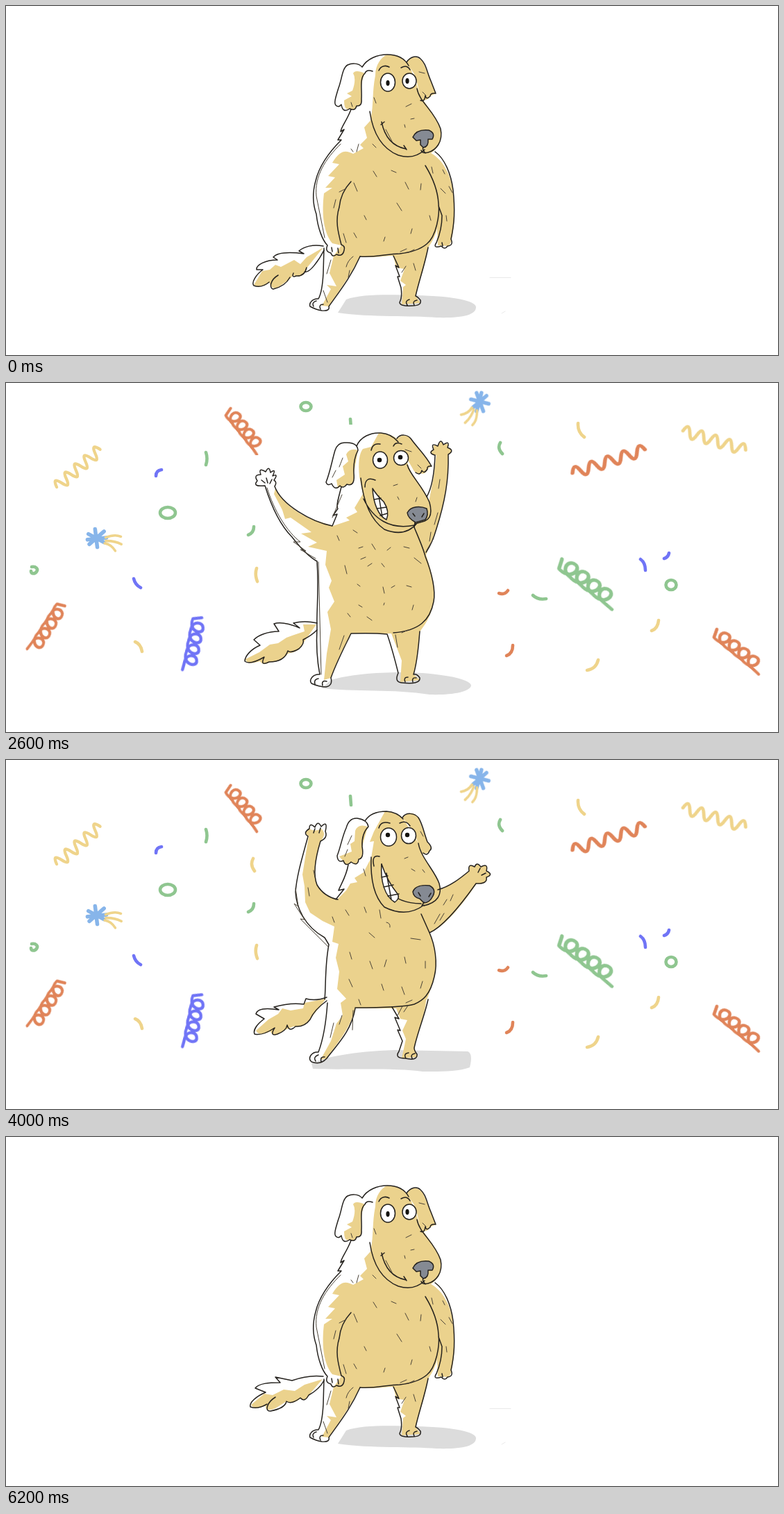
An HTML page without scripts for the animation above (6400 ms loop, 1112 by 503 pixels).

```html
<!DOCTYPE html>
<html lang="en">
<head>
<meta charset="utf-8">
<title>Party dog</title>
<style>
html, body { margin: 0; width: 100%; height: 100%; overflow: hidden; background: #fff; }
svg { display: block; width: 100%; height: 100%; }
.fur { fill: #ebd28d; }
.white { fill: #fff; }
.shade { fill: #dcdcdc; }
.nose { fill: #858a93; }
.dog { stroke-linecap: round; stroke-linejoin: round; }
.line { fill: none; stroke: #25221e; stroke-width: 1.5; }
.thin { fill: none; stroke: #4a4337; stroke-width: 1; }
.eye { fill: #fff; stroke: #25221e; stroke-width: 1.5; }
.pupil { fill: #15130f; }
.confetti { fill: none; stroke-width: 4.6; stroke-linecap: round; stroke-linejoin: round; }
.confetti path, .confetti ellipse { vector-effect: non-scaling-stroke; }
.red { stroke: #e08459; } .gold { stroke: #efd48b; } .green { stroke: #8fc690; }
.blue { stroke: #7074f6; } .sky { stroke: #87b5ea; }

/* 32 beats of 200 ms, 3.125% each */
.dog, .confetti, .tail, .gap { animation: 6.4s step-end infinite; }
.idle { animation-name: idle; }
.down { animation-name: down; }
.up { animation-name: up; }
.wide { animation-name: wide; }
.tilt { animation-name: tilt; }
.fall1 { animation-name: fall1; }
.fall2 { animation-name: fall2; }
.gap { animation-name: gap; }
@keyframes idle { 0%, 87.5% { opacity: 1 } 34.375% { opacity: 0 } }
@keyframes down {
  0%, 18.75%, 25%, 31.25%, 93.75% { opacity: 1 }
  15.625%, 21.875%, 28.125%, 90.625%, 96.875% { opacity: 0 }
  87.5% { opacity: 1 }
}
@keyframes up {
  0%, 18.75%, 25%, 31.25%, 93.75% { opacity: 0 }
  15.625%, 21.875%, 28.125%, 90.625%, 96.875% { opacity: 1 }
}
@keyframes wide {
  0%, 37.5%, 43.75%, 50%, 56.25%, 62.5%, 68.75%, 78.125%, 84.375% { opacity: 0 }
  34.375%, 40.625%, 46.875%, 53.125%, 59.375%, 65.625%, 75%, 81.25% { opacity: 1 }
}
@keyframes tilt {
  0%, 40.625%, 46.875%, 53.125%, 59.375%, 65.625%, 75%, 81.25%, 87.5% { opacity: 0 }
  37.5%, 43.75%, 50%, 56.25%, 62.5%, 68.75%, 78.125%, 84.375% { opacity: 1 }
}
@keyframes fall1 {
  0%, 37.5%, 50%, 62.5%, 78.125%, 87.5% { opacity: 0 }
  34.375%, 43.75%, 56.25%, 71.875%, 84.375% { opacity: 1 }
}
@keyframes fall2 {
  0%, 43.75%, 56.25%, 71.875%, 84.375% { opacity: 0 }
  37.5%, 50%, 62.5%, 78.125% { opacity: 1 }
}
@keyframes gap { 0%, 50% { opacity: 0 } 34.375% { opacity: 1 } }
</style>
</head>
<body>
<svg viewBox="0 0 1112 503">
<defs>
  <path id="wave" d="M0 0q5-16 10 0t10 0 10 0 10 0 10 0 10 0 10 0 10 0 10 0"/>
  <path id="coil" d="M-3-6L1 7c20 5 23-19 12-18s-9 19 5 18c20 5 23-19 12-18s-9 19 5 18c20 5 23-19 12-18s-9 19 5 18c20 5 23-19 12-18s-9 19 5 18l12 1"/>
  <g id="star">
    <path class="sky" d="M-10-3L10 4M8-9L-7 9M-3-10L3 11M-10 4L12-2"/>
    <path class="gold" stroke-width="3" d="M11-2q10-6 18-4M12 2q10-2 19 1M11 5q8 0 14 7"/>
  </g>
</defs>

<g class="confetti fall1">
  <use href="#wave" class="gold" transform="translate(51 164)rotate(-34)scale(1.04 1)"/>
  <use href="#wave" class="red" transform="translate(835 124)rotate(-17)scale(1.18 1)"/>
  <use href="#wave" class="gold" transform="translate(996 68)rotate(27)scale(1.06 1)"/>
  <use href="#coil" class="red" transform="translate(330 56)rotate(57)scale(.87 .9)"/>
  <use href="#coil" class="red" transform="translate(64 330)rotate(112)scale(1 .9)"/>
  <use href="#coil" class="blue" transform="translate(270 356)rotate(90)scale(.92 .95)"/>
  <use href="#coil" class="green" transform="translate(813 274)rotate(39)scale(1.2 1.05)"/>
  <use href="#coil" class="red" transform="translate(1045 374)rotate(51)scale(.92 .9)"/>
  <use href="#star" transform="translate(687 23)rotate(132)scale(1.1 .85)"/>
  <use href="#star" transform="translate(127 223)"/>
  <g class="green">
    <ellipse cx="430" cy="41" rx="6.5" ry="5"/><ellipse cx="232" cy="191" rx="9" ry="7"/>
    <ellipse cx="961" cy="298" rx="8.5" ry="6.5"/><path d="M46 268c-4 3-8 1-8-2s5-2 7-1"/>
    <path d="M285 121q7-5 6-16M337 226q11 2 19-5M712 95q6 9 17 7M768 316q6 1 11-2M489 76q9-5 11-17"/>
  </g>
  <g class="gold">
    <path d="M360 276q3 11 15 12M196 379q3 12-3 19M928 359q7 2 11-4M833 417q15 5 24-4M832 71q5 9 17 7M357 151q2 9 11 11"/>
  </g>
  <path class="blue" d="M221 136q-3 4-1 9M190 293q9 6 20 2M916 274q6-2 5-8M947 257q8-1 11-8"/>
  <path class="red" d="M706 308q14 4 21-6M713 400q14 2 20-10"/>
</g>

<g class="confetti fall2">
  <use href="#wave" class="gold" transform="translate(73 150)rotate(-41)scale(.92 1)"/>
  <use href="#wave" class="red" transform="translate(816 130)rotate(-18)scale(1.22 1)"/>
  <use href="#wave" class="gold" transform="translate(975 69)rotate(17)scale(1.05 1)"/>
  <use href="#coil" class="red" transform="translate(321 42)rotate(51)scale(.9)"/>
  <use href="#coil" class="red" transform="translate(79 321)rotate(123)scale(.97 .85)"/>
  <use href="#coil" class="blue" transform="translate(276 340)rotate(101)scale(.94)"/>
  <use href="#coil" class="green" transform="translate(800 261)rotate(37)scale(1.2 1.05)"/>
  <use href="#coil" class="red" transform="translate(1023 361)rotate(39)scale(1.04 .9)"/>
  <use href="#star" transform="translate(683 27)rotate(120)scale(1.2)"/>
  <use href="#star" transform="translate(130 223)rotate(9)scale(1.2)"/>
  <g class="green">
    <ellipse cx="432" cy="34" rx="7.5" ry="6"/><ellipse cx="233" cy="187" rx="11" ry="8"/>
    <ellipse cx="958" cy="291" rx="7.5" ry="7"/><path d="M37 265c6-1 10 3 7 7s-8 3-8-1"/>
    <path d="M288 100q3 9 0 18M349 219q8-3 8-12M712 86q-5 8 3 16M759 306q7 7 19 5M496 52l1 13"/>
  </g>
  <g class="gold">
    <path d="M356 142q-5 9 2 18M361 267q-3 9 1 19M186 373q8 3 10 14M930 357q9-3 10-15M837 414q13-2 16-15M824 58q-1 13 9 20"/>
  </g>
  <path class="blue" d="M216 134q0-8 8-9M184 282q2 9 10 13M914 254q7 5 7 16M948 253q6-2 7-8"/>
  <path class="red" d="M710 303q8 3 13-4M721 393q9-3 9-15"/>
</g>

<g class="dog idle">
  <path class="shade" d="M478 442L490 423C512 415 550 416 590 417C645 418 677 425 677 434C677 446 655 450 620 449C585 446 525 449 478 442Z"/>
  <path fill="none" stroke="#e9e9e9" d="M697 391.500H727M714 443l5-3"/>
  <g class="tail down">
    <path class="fur" d="M457 348L433 362L424 372L415 366L396 376L388 373L380 380L369 382L357 402Q368 408 379 398Q384 412 394 404L408 394L414 388Q428 395 433 378Z"/>
    <path class="line" d="M457 346C442 343 429 347 422 353L429 357C405 354 390 356 385 362L391 366C374 366 360 373 361 380L370 380C360 387 353 399 357 403Q368 407 379 398M392 388C380 395 379 407 385 408Q402 404 409 391M414 385Q411 392 418 389Q430 390 433 377M430 383C437 386 451 366 458 352"/>
  </g>
  <g class="tail up">
    <path class="fur" d="M456 349L430 357L416 366L400 364L384 372L372 370L353 386Q357 394 374 387Q373 397 388 391L404 381Q413 386 424 377Q432 383 436 372Z"/>
    <path class="line" d="M457 345C440 343 423 347 412 351L388 346L395 354C378 354 364 355 359 362L374 368C360 374 350 383 352 389Q362 393 376 385M388 375C376 382 372 396 381 395Q402 391 404 381Q411 386 424 376Q430 383 436 372Q451 364 458 351"/>
  </g>
  <path class="fur" d="M549 70C565 70 575 77 582 88L594 120C597 137 618 152 626 178C630 196 620 207 612 212C630 222 642 245 644 270C647 300 646 320 641 340L638 346L622 345L621 320C618 335 610 345 607 350C604 375 594 400 590 418L597 428L570 430L572 405L576 402L568 396L574 379L562 377L558 360C545 360 525 364 510 361C495 390 480 410 465 433L455 432L468 408L462 402L476 404L466 385L472 360L483 345L470 342C456 325 455 295 458 270L470 262L460 262L474 247L464 245L480 228L470 226C482 206 490 208 500 213L515 205L510 200L520 190L516 175L525 165C530 140 527 125 532 100C532 85 540 74 549 70Z"/>
  <path class="fur" d="M517 97Q503 91 500 97Q505 105 499 122L491 126L498 130L487 136Q487 152 495 148Q503 151 505 144Q513 144 512 134Q510 110 517 97ZM577 81Q588 67 600 80Q606 92 619 126L611 130Q607 138 597 135Q596 122 588 98Z"/>
  <path class="line" d="M513 88C520 76 535 70 549 70C563 70 574 75 580 86M513 88C508 82 498 82 492 85C484 90 484 105 479 118C475 131 472 140 475 143Q479 147 483 142Q485 155 495 148Q503 152 505 144Q513 145 512 134C513 120 509 104 517 97Q519 91 528 94M577 81C583 72 592 71 597 76C605 83 606 94 612 108L619 126Q611 125 611 130Q605 136 604 129Q603 139 597 136M592 119C595 138 617 151 626 177C630 196 619 208 608 211Q599 213 598 208M524 152C528 180 540 205 565 215Q588 222 603 207"/>
  <path class="line" stroke-width="2" d="M541 167C545 187 556 202 576 206M573 201L577 207M540 171L545 167M537 93C540 86 547 85 552 88M569 89Q578 84 582 92M601 203Q599 207 604 212"/>
  <path class="line" d="M497 149C491 165 483 174 482 181L487 178L478 193L483 193C466 210 451 231 446 252C441 270 442 286 447 300C449 320 456 338 463 345Q459 354 468 356Q470 363 476 358Q485 362 487 352Q489 346 483 344C478 325 474 309 480 290Q482 269 497 253M510 361C530 363 550 357 567 357Q593 354 606 343C620 332 625 300 623 285C622 266 615 248 604 230M618 210C632 220 641 242 644 265C647 294 646 313 641 336Q645 345 636 346Q632 352 627 346Q614 350 620 341Q628 322 628 302L623 288"/>
  <path class="line" d="M458 349L457 385C456 404 454 415 450 422C442 421 436 428 438 433Q447 438 455 439Q467 440 465 433C482 409 497 390 510 361M443 433q-3-6 4-8M453 437q-3-7 4-7M558 360L566 377L561 374L567 390L564 390L569 406Q571 420 567 427Q567 433 585 432Q599 432 597 424Q593 419 590 418C594 399 604 370 608 348M578 431q-4-6 3-8M588 431q-3-6 4-7M470 354l-1-6M479 356l-1-7M629 346l-1-5"/>
  <path class="thin" d="M482 199C460 220 444 246 447 274L459 334M500 361Q492 367 490 376M480 268l10-5M472 291l3-12M462 386l6-20M457 410l6 17M615 241l-2-9M629 236l3 6M626 263l7 7M638 260l5 9M634 302l1 8M497 206l3 4M508 199l-3 11M528 199l5 5M547 178l9 17M529 238l5 8M501 255l5 12M555 237l7 3M575 254l5 10M598 256l-1 9M563 284l7 11M516 302l3 6M610 302l2 7M546 333l-2 6M501 327l4 7M585 321l-2 7M486 328l4 13M568 354l9-4M580 355l8-4M576 145l8-4M583 163l5-1M574 171l1 4M595 95l8 2M600 124l5 5M497 139l2 6M570 384l6-9M587 371l3 10M493 391l2-10M530 132l3 8"/>
  <path class="nose line" style="fill:#858a93" d="M586 189C590 180 600 178 609 179Q619 183 614 192L608 192Q609 203 601 204L597 200V193L591 194Z"/>
  <ellipse class="eye" cx="550" cy="110" rx="10.500" ry="13"/><ellipse class="eye" cx="581" cy="108" rx="10" ry="11"/>
  <ellipse class="pupil" cx="550" cy="111" rx="2.600" ry="4"/><ellipse class="pupil" cx="578" cy="108" rx="2.600" ry="4"/>
</g>

<g class="dog wide">
  <path class="white" d="M350 138h24v32h-24z"/>
  <path class="white gap" d="M354 104h24v22h-24zM484 60h24v20h-24z"/>
  <path class="shade" d="M455 440L468 428C500 418 560 415 600 418C650 422 670 430 670 436C668 446 640 450 610 449C560 441 500 445 455 440Z"/>
  <path class="fur" d="M447 348L428 348L430 358L415 363L404 367L392 375L380 377L365 388L345 398Q346 407 366 401Q370 408 381 402Q396 403 406 390Q424 387 428 375Z"/>
  <path class="fur" d="M537 72Q560 73 568 86L580 120C584 134 602 150 610 172Q615 193 604 198L616 135L620 103L637 102C638 140 631 172 620 210L605 248C614 275 620 300 615 318C612 342 595 357 596 360Q593 400 587 420L596 428L568 431L570 400L562 379L555 361H497C484 385 475 405 468 425L458 428L462 390L468 355L463 330L473 315L465 295L469 285L460 262L462 242L435 236L448 230L425 217L440 215L410 194L402 196L398 183L386 160L388 152C398 172 418 187 440 196L471 206L495 198L490 194L506 186L502 180L514 160L509 135Q506 105 514 95L526 92Z"/>
  <path class="fur" d="M507 97Q495 93 490 103L493 113L485 120L488 132L476 140L478 151L491 147Q503 147 501 130ZM563 80Q575 71 583 80C592 93 604 103 613 120L607 124Q604 133 597 130Q590 133 585 122L578 110ZM619 104Q607 101 616 96Q614 85 622 91Q626 80 630 89Q640 85 636 93Q647 97 637 104Z"/>
  <path class="line" d="M505 91C510 78 525 71 540 72Q555 73 565 85M507 97Q506 85 489 86Q478 85 474 97C470 110 467 128 461 143Q463 149 469 145Q474 156 481 148Q486 153 491 146Q503 150 501 130Q500 110 507 97M563 80C568 73 578 74 583 80C592 93 604 103 613 120Q606 119 607 124Q602 132 599 126Q597 134 590 129M578 118C582 133 600 148 610 172Q616 194 603 199L589 203M511 137C514 165 522 195 545 211Q575 223 592 202M515 167C529 196 553 212 588 205M517 150Q517 134 532 140M526 97Q528 86 539 88M558 91Q561 84 570 88"/>
  <path class="line" d="M483 150C479 165 475 178 478 181L471 191L477 189L470 206C440 200 397 176 387 149Q391 143 386 140Q393 130 384 134Q390 122 381 129Q379 118 374 128Q363 121 367 132Q356 132 362 141Q354 150 373 148C383 180 395 205 412 222Q432 248 448 257C451 300 447 330 448 352Q446 390 452 420C442 419 436 428 440 433Q451 438 461 438Q471 436 468 425C475 405 485 385 497 361Q530 360 549 362C556 382 561 402 565 418Q559 431 570 432Q597 435 596 425Q592 419 587 420C593 400 594 380 596 358M588 208C595 225 601 238 604 250C614 275 619 300 616 315C611 342 595 357 558 360M637 103C638 140 632 172 620 210Q614 231 605 244M618 104C617 130 613 152 606 164M618 104Q607 101 616 96Q611 85 622 91Q626 78 630 89Q640 82 636 93Q647 97 637 103"/>
  <path class="line" d="M448 346Q430 342 414 346L423 353C406 346 395 344 386 347L393 358C376 358 363 364 357 370L366 378C354 383 344 393 344 401Q351 407 372 395Q365 409 379 402Q401 402 406 386Q410 390 422 383Q430 376 428 370Q440 364 448 356M445 434q-2-7 5-8M456 436q-2-8 6-6M575 431q-3-7 4-7M586 431q-2-7 5-6M368 140l5 4M375 137l2 7M383 139l-3 6"/>
  <path class="thin" d="M376 151C386 184 405 215 424 229L414 229L432 242L424 240L446 253M450 258L454 420M484 161L470 194M487 364l-7 20M495 366l-9 17M561 363l3 18M570 360l9-4M477 220l3 7M500 212l6 4M527 232l5 8M549 241l5-4M508 238l6-2M511 254l7-3M521 264l6-4M541 260l4 5M573 236l8 2M588 252l10 8M488 263l3 12M506 290l4 3M543 294l2 9M555 295l5-3M577 292l7 2M587 320l-2 7M508 320l5 3M520 337l7 5M545 317l-1 3M492 332l4 5M610 228l2-13M606 241l10-17M617 204l5-17M558 148l6-2M564 164l2 4M590 171l2-6M623 152l2-13M575 96l9 3M593 118l5 5M480 121l5-13M470 136l5-10"/>
  <path class="line white" style="fill:#fff" d="M528 152C529 174 537 192 548 197Q553 185 544 171Q534 162 528 152ZM530 168L540 166M534 181L548 179M539 191L549 188M537 163L542 193"/>
  <path class="line" style="fill:#858a93" d="M578 187C583 177 597 177 606 181Q609 190 604 197L590 201Q579 195 578 187ZM589 201L588 208M586 188l3 4M602 188l-3 5"/>
  <ellipse class="eye" cx="539" cy="111" rx="10.500" ry="12"/><circle class="eye" cx="569" cy="108" r="10.500"/>
  <circle class="pupil" cx="538" cy="111" r="3.300"/><circle class="pupil" cx="568" cy="107" r="3.300"/>
</g>

<g class="dog tilt">
  <path class="white" d="M484 67h20v13h-20z"/>
  <path class="shade" d="M440 437C460 428 500 420 560 418L665 420Q673 423 668 443C650 450 620 449 600 449C560 443 480 447 442 445Z"/>
  <path class="fur" d="M461 344L430 350L428 358L410 361L398 358L392 366L378 374L360 390Q364 399 381 391Q384 401 400 390L414 384Q429 387 440 371Z"/>
  <path class="fur" d="M546 74Q566 76 573 86L594 120C597 140 618 160 624 178L626 186C642 180 656 169 667 160L678 178C655 212 632 240 610 249C618 267 622 295 617 312Q610 338 605 347C604 365 592 395 588 416L593 428L570 430L576 402L571 390L578 375L568 373L562 358H503C495 390 475 410 462 430L453 432L468 405L476 380L485 368L482 350L490 344L477 330L480 305L475 285L479 265L470 262L473 240L456 232L438 220L431 205L430 182L427 165L436 110H455C446 140 442 165 448 180Q460 199 478 200L490 188L496 178L506 176L502 170L515 162L526 141L530 117L524 118L530 103Z"/>
  <path class="fur" d="M521 96Q507 91 503 102L502 117L496 121L498 132L480 139L486 146Q489 154 497 147Q508 153 508 143Q516 140 513 125ZM571 83Q584 70 594 83L607 118Q617 130 606 134L599 136L588 104ZM667 161Q664 149 675 154Q679 146 684 154Q696 148 692 160Q703 166 692 169Q695 180 677 178ZM436 110Q427 103 437 99Q445 104 454 99Q462 106 454 116Z"/>
  <path class="line" d="M517 88C523 78 535 74 548 74Q563 75 572 85M522 96Q520 86 506 84Q494 83 490 98C484 111 482 126 477 138Q478 149 486 145Q489 155 497 147Q507 154 508 143Q516 142 513 125Q512 106 522 96M571 83C576 75 588 76 594 83C600 92 602 105 607 118Q616 127 610 131Q607 139 601 134M594 120C597 140 618 160 624 178Q631 203 602 210M526 140C525 165 528 195 545 212Q577 228 602 209M530 153Q526 136 538 139M541 150C540 178 550 206 598 207M537 98Q540 87 553 91M567 91Q576 86 582 95"/>
  <path class="line" d="M435 110C427 140 419 165 417 190C418 212 430 240 459 256L465 266C459 298 461 326 459 345M453 117C446 140 442 165 448 180Q458 197 478 201M493 151C490 168 483 178 479 188L487 186L475 201M435 110Q427 105 437 99Q437 89 445 97Q449 86 454 96Q464 86 460 103Q464 112 453 117M622 187C640 182 655 170 667 160M610 249C630 240 653 212 677 178M667 160Q665 148 675 154Q678 146 684 154Q695 148 692 160Q703 165 692 169Q694 179 677 178M598 222L610 249C618 267 622 292 617 312C611 339 600 347 588 352Q570 357 503 357"/>
  <path class="line" d="M463 350C461 380 456 405 450 421C440 420 434 430 440 435Q453 440 462 430C476 411 497 392 503 358M556 356L566 373L560 371L568 390L564 389L571 405L566 420Q559 430 575 430Q593 434 592 424Q588 419 588 415C592 395 604 365 608 345M462 342Q446 348 432 344L429 352C415 350 400 352 386 356L393 360C375 357 362 358 360 366L372 373C360 382 356 390 358 395Q369 398 387 386Q379 399 391 395Q404 390 405 382Q408 393 417 384Q430 385 438 374Q444 360 462 347M446 434q-4-6 4-9M454 435q-2-8 5-7M576 430q-4-7 4-8M585 430q-3-6 4-7M443 105l2-6M451 105l2-7M683 156l-3 6M691 163l-6 3"/>
  <path class="thin" d="M417 185L421 211L415 207L430 230L424 229L464 269M500 361l-1 28M564 368l7-13M573 363l6-9M470 226l3 8M489 216l5 8M516 212l3 8M538 216l2 12M548 234q6 1 5 7M523 249l8 7M583 257l14 2M495 277l3 10M524 290l4 11M548 288l-3 10M574 284l2 9M604 290v10M494 316l5 11M541 323l3 9M570 327l4 11M600 319l-3 10M508 345l3 8M576 350l9-4M435 184l2 12M443 159l2 10M630 209l5-8M617 236l8-14M625 231l6-10M640 203l4-9M515 157l3 10M574 142l5-2M584 157l5 3M600 158l3 4M492 122l6-13M488 139l4-10M597 103l4 7M467 400l5-21M480 381l4-13"/>
  <path class="line" style="fill:#fff" d="M541 150C539 175 546 197 560 205Q568 199 564 193C555 182 546 165 541 150ZM541 169L550 167M544 183L558 180M550 196L566 193M548 163L555 201"/>
  <path class="line" style="fill:#858a93" d="M586 190C589 181 601 180 610 181Q620 186 615 196Q610 206 602 206L596 200Q587 198 586 190ZM594 191l3 5M612 192l-3 5M602 205L599 210"/>
  <ellipse class="eye" cx="551" cy="111" rx="11.500" ry="13"/><ellipse class="eye" cx="580" cy="109" rx="10.500" ry="11.500"/>
  <circle class="pupil" cx="550" cy="108" r="3.200"/><circle class="pupil" cx="578" cy="108" r="3.200"/>
</g>
</svg>
</body>
</html>
```
